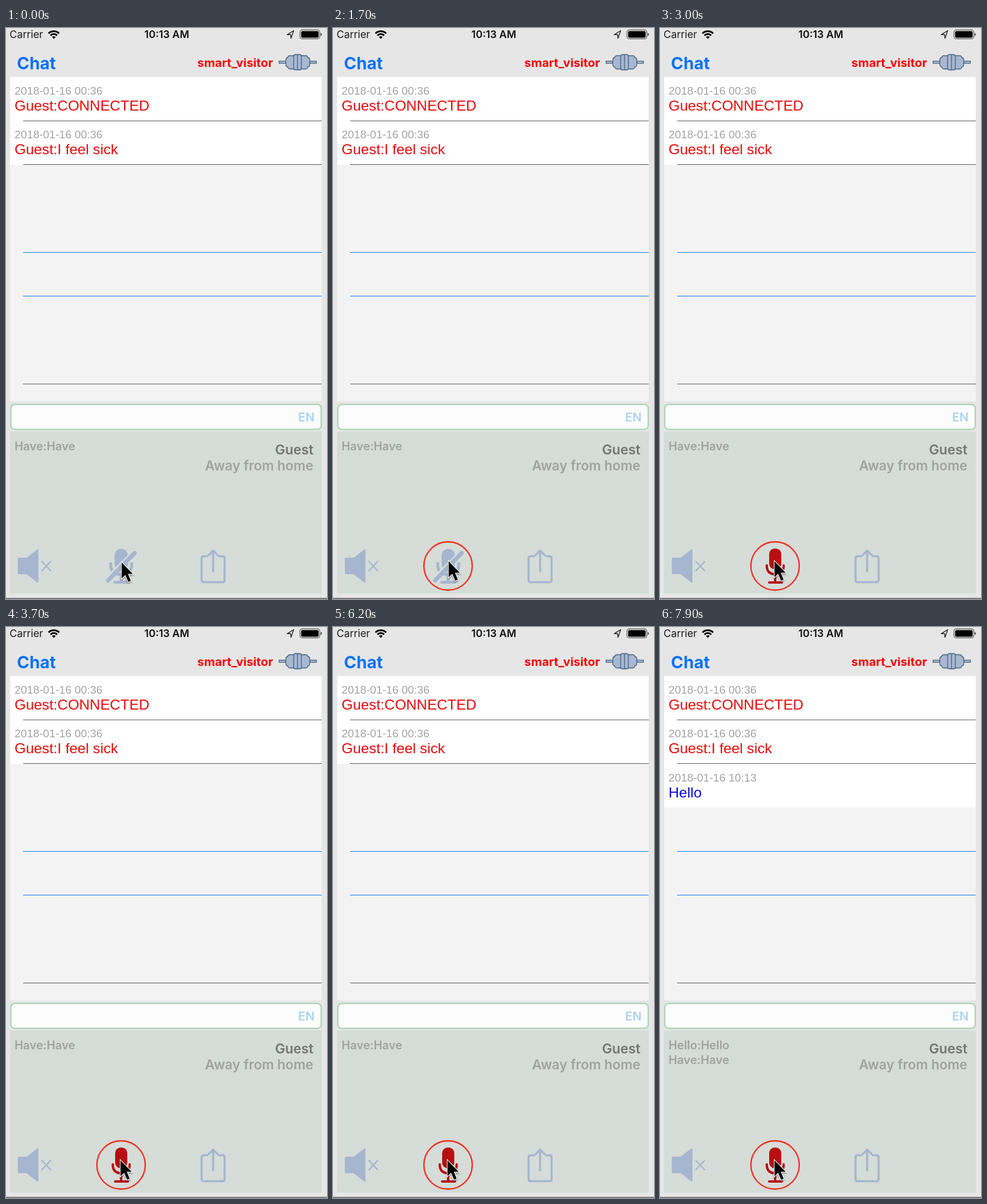
An HTML page for the animation above (8000 ms loop, 544 by 968 pixels).

```html
<!DOCTYPE html>
<html lang="en">
<head>
<meta charset="utf-8">
<title>Chat</title>
<style>
  html, body { margin: 0; width: 100%; height: 100%; overflow: hidden; background: #e6e6e6; }
  svg { display: block; width: 544px; height: 968px; }
  text { font-family: Inter, Roboto, sans-serif; font-weight: 600; white-space: pre; }
  .end { text-anchor: end; }
  .row text { font-family: "Liberation Sans", Arial, sans-serif; font-weight: 400; font-size: 24.65px; }
  .row .date { font-size: 18.86px; fill: #a3a3a3; }
  .note { font-size: 19.6px; fill: #a0a3a1; }
  .line { fill: none; stroke-linecap: round; stroke-linejoin: round; }
</style>
</head>
<body>
<svg viewBox="0 0 544 968">
  <defs>
    <clipPath id="tableClip"><rect x="7" y="83" width="528" height="550"/></clipPath>
    <clipPath id="rowClip"><rect id="reveal" x="7" y="232" width="528" height="0"/></clipPath>
    <filter id="shadow" x="-50%" y="-50%" width="220%" height="220%">
      <feDropShadow dx="0" dy="2" stdDeviation="1.5" flood-opacity=".4"/>
    </filter>
  </defs>
  <rect width="544" height="968" fill="#e6e6e6"/>

  <!-- status bar -->
  <text x="6" y="17" font-size="17.4" style="font-weight:400" fill="#1c1c1c">Carrier</text>
  <g class="line" stroke="#050505" stroke-width="3" style="stroke-linecap:butt">
    <path d="M72 9.2a12.7 12.7 0 0 1 18 0M75.3 12.7a8 8 0 0 1 11.4 0"/>
    <path d="M81 18.4l-3.1-3.2a4.4 4.4 0 0 1 6.2 0z" fill="#050505" stroke="none"/>
  </g>
  <text x="272.5" y="17" font-size="17.4" text-anchor="middle" fill="#111">10:13 AM</text>
  <path class="line" d="M487.5 4.5L476.5 11.3H482.3L483 17.5Z" stroke="#222" stroke-width="1.4"/>
  <rect x="498.2" y="3.2" width="33.6" height="15.2" rx="4" fill="none" stroke="#555" stroke-width="1.2"/>
  <rect x="500.2" y="5.2" width="29.6" height="11.2" rx="2" fill="#000"/>
  <path d="M533.3 8.2q2.2 .5 2.2 2.7t-2.2 2.7z" fill="#555"/>

  <!-- header -->
  <text x="18.5" y="70" font-size="28.6" style="font-weight:700" fill="#0a72f5">Chat</text>
  <text class="end" x="452.5" y="66" font-size="20.3" style="font-weight:700" fill="#f20505">smart_visitor</text>
  <g fill="#a8b8d2" stroke="#46617f" stroke-width="1.3">
    <rect x="462.8" y="56.2" width="13" height="3.6"/>
    <rect x="513" y="56.2" width="13" height="3.6"/>
    <path d="M488 47H481Q478 47 477.5 50Q474.3 50.5 474.3 53.5V62.5Q474.3 65.5 477.5 66Q478 69.500 481 69.500H488Z"/>
    <path d="M500 47H508Q511 47 511.500 50Q514.700 50.500 514.700 53.500V62.500Q514.700 65.500 511.500 66Q511 69.500 508 69.500H500Z"/>
    <rect x="487.500" y="45" width="13" height="26" rx="3"/>
    <path d="M494 45V71"/>
  </g>

  <!-- message table -->
  <g clip-path="url(#tableClip)">
    <rect x="7" y="83" width="528" height="550" fill="#f3f3f3"/>
    <rect x="7" y="83" width="528" height="149" fill="#fff"/>
    <g id="rows"></g>
    <g id="newRow" clip-path="url(#rowClip)">
      <rect x="7" y="232" width="528" height="74" fill="#fff"/>
    </g>
    <g id="fixedLines"></g>
    <g id="lines"></g>
  </g>

  <!-- input and panel -->
  <rect x="8.200" y="638.200" width="526" height="42.200" rx="6.500" fill="#fcfcfc" stroke="#aed3b5" stroke-width="2.300"/>
  <text class="end" x="523" y="667" font-size="20.500" fill="#acd3f0">EN</text>
  <rect x="7" y="684" width="528" height="275" fill="#d6dcd8"/>
  <rect y="966" width="544" height="2" fill="#7b7b7b"/>
  <text class="note" id="heard" x="14.500" y="716">Hello:Hello</text>
  <text class="note" id="have" x="14.500" y="716">Have:Have</text>
  <text class="end" x="521" y="722.500" font-size="22.800" fill="#737674">Guest</text>
  <text class="end" x="521" y="750" font-size="22.600" fill="#a0a3a1">Away from home</text>

  <!-- speaker and share -->
  <path d="M22 898H35L53 884Q55 883 55 885V939Q55 941 53 940L35 926H22Q20 926 20 924V900Q20 898 22 898Z" fill="#a7b6d0"/>
  <path class="line" d="M61 904.500L75.500 920M75.500 904.500L61 920" stroke="#a7b6d0" stroke-width="2.400"/>
  <path class="line" d="M341 895.500H335Q331.500 895.500 331.500 899V936Q331.500 939.500 335 939.500H367Q370.500 939.500 370.500 936V899Q370.500 895.500 367 895.500H361M351 921V886M343.500 893.500L351 886L358.500 893.500" stroke="#a7b6d0" stroke-width="3.600"/>

  <!-- microphone -->
  <g id="micOff">
    <rect x="184" y="883" width="22.500" height="37" rx="11.200" fill="currentColor"/>
    <path class="line" d="M177.500 908V912Q179 926.500 195.200 926.500Q211.500 926.500 213 912V908" stroke="currentColor" stroke-width="5"/>
    <path class="line" d="M195.200 927V938M184.500 939.500H206" stroke="currentColor" stroke-width="5"/>
    <path class="line" d="M169 934L215 888" stroke="#d6dcd8" stroke-width="4"/>
    <path class="line" d="M173 936.500L218 890" stroke="currentColor" stroke-width="7"/>
  </g>
  <g id="micOn" fill="#b80f12" color="#b80f12">
    <rect x="185" y="882.500" width="20.500" height="35" rx="9"/>
    <path class="line" d="M181 911V914Q182.500 926 195.200 926Q208 926 209.500 914V911" stroke="currentColor" stroke-width="4"/>
    <path class="line" d="M195.200 926V939M185 940H206.500" stroke="currentColor" stroke-width="4"/>
  </g>
  <circle id="pressRing" cx="194" cy="908" r="43.500" fill="none" stroke="#000" stroke-width="3"/>
  <circle id="liveRing" cx="195" cy="912" r="41" fill="none" stroke="#f03020" stroke-width="2.400"/>
  <path id="cursor" d="M0 0V27L6.200 21.300L11.200 33L15.600 31.200L10.700 19.600H19Z" fill="#000" stroke="#fff" stroke-width="2" paint-order="stroke" filter="url(#shadow)"/>
</svg>
<script>
  const LOOP = 8000, ROW = 74.3;
  const PRESS = 800, RELEASE = 1400, LIVE = 2800, HEARD = 6500;
  const SLIDE = 7048, SLIDE_TIME = 300;
  const DARK = '#5c5c5c', BLUE = '#0f78f2';
  // time, x, y of the pointer tip
  const POINTER = [[0, 196, 906], [PRESS, 194, 907], [RELEASE, 196, 904], [LIVE, 194, 904]];

  const $ = id => document.getElementById(id);
  const add = (parent, tag, attrs, label = '') => {
    const el = document.createElementNS('http://www.w3.org/2000/svg', tag);
    for (const key in attrs) el.setAttribute(key, attrs[key]);
    el.textContent = label;
    return parent.appendChild(el);
  };
  const show = (id, on) => { $(id).style.display = on ? '' : 'none'; };

  function addMessage(parent, index, date, words, fill) {
    const top = Math.round(83 + index * ROW);
    const row = add(parent, 'g', { class: 'row' });
    add(row, 'text', { class: 'date', x: 14.5, y: top + 29.5 }, date);
    add(row, 'text', { x: 14.5, y: top + 57, fill }, words);
  }
  const addLine = (parent, y, fill) =>
    add(parent, 'rect', { x: 29, y, width: 506, height: 1, fill });

  addMessage($('rows'), 0, '2018-01-16 00:36', 'Guest:CONNECTED', '#e60a0a');
  addMessage($('rows'), 1, '2018-01-16 00:36', 'Guest:I feel sick', '#e60a0a');
  addMessage($('newRow'), 2, '2018-01-16 10:13', 'Hello', '#0a0ad2');
  [157, 231].forEach(y => addLine($('fixedLines'), y, DARK));
  const edge = addLine($('lines'), 231, DARK);
  addLine($('lines'), 380, BLUE);
  addLine($('lines'), 454, BLUE);
  const extra = addLine($('lines'), 528, BLUE);
  addLine($('lines'), 603, DARK);

  function draw(t) {
    const pressed = t >= PRESS && t < RELEASE;
    const live = t >= LIVE;
    show('pressRing', pressed);
    show('liveRing', t >= RELEASE);
    show('micOff', !live);
    show('micOn', live);
    $('micOff').style.color = pressed ? '#505968' : '#a7b6d0';

    const [, x, y] = POINTER.filter(p => p[0] <= t).pop();
    $('cursor').setAttribute('transform', `translate(${x} ${y})`);

    show('heard', t >= HEARD);
    $('have').setAttribute('y', t >= HEARD ? 741 : 716);

    const u = Math.min(1, Math.max(0, (t - SLIDE) / SLIDE_TIME));
    const shift = Math.round(ROW * u * u * (3 - 2 * u));
    const sliding = u > 0 && u < 1;
    $('reveal').setAttribute('height', shift);
    $('lines').setAttribute('transform', `translate(0 ${sliding ? shift : 0})`);
    for (const line of [edge, extra]) line.style.display = sliding ? '' : 'none';
  }

  const start = performance.now();
  function tick() {
    draw((performance.now() - start) % LOOP);
    requestAnimationFrame(tick);
  }
  tick();
</script>
</body>
</html>
```
